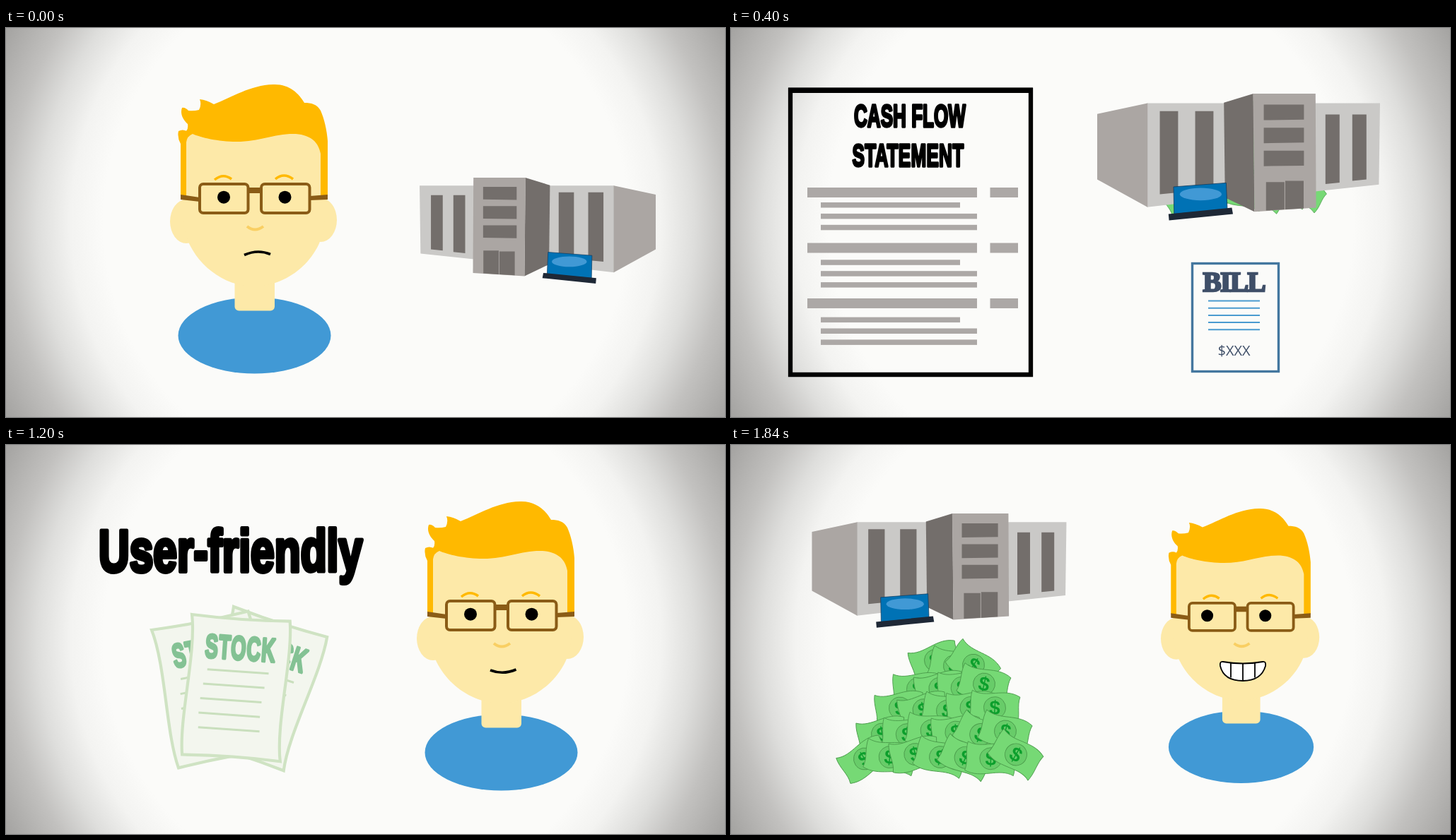
Animation of 1017 by 551 pixels, one loop 2 s. Source, as an HTML page:

```html
<!DOCTYPE html>
<html lang="en">
<head>
<meta charset="utf-8">
<title>Cash flow explainer</title>
<style>
  html, body { margin: 0; width: 100%; height: 100%; overflow: hidden; background: #fbfbf9; }
  svg { display: block; width: 100%; height: 100%; }
  .display { font-family: "Liberation Sans", Arial, sans-serif; font-weight: 700; stroke-linejoin: round; }
  .slab { font-family: "Liberation Serif", "Noto Serif", serif; font-weight: 700; }
  .light { font-family: "Open Sans", "Noto Sans", sans-serif; }
</style>
</head>
<body>
<svg id="stage" viewBox="0 0 1017 551" preserveAspectRatio="none" xmlns="http://www.w3.org/2000/svg"></svg>
<script>
const HOLD = 400;
const CAPS = 0.58, MIXED = 0.72; // the two condensed cuts of the display type

const SKIN = '#fde9a8', HAIR = '#ffb900', FRAME = '#8a5c16';
const LIGHT = '#cac9c7', MID = '#aba6a3', DARK = '#736e6b';
const BLUE = '#4199d5', INK = '#3f4f68';

const repeat = (n, make) => Array.from({ length: n }, (_, i) => make(i)).join('');
const poly = (points, fill, extra = '') => `<polygon points="${points}" fill="${fill}" ${extra}/>`;
const rect = (x, y, w, h, attrs = '') => `<rect x="${x}" y="${y}" width="${w}" height="${h}" ${attrs}/>`;
const oval = (cx, cy, rx, ry, fill) => `<ellipse cx="${cx}" cy="${cy}" rx="${rx}" ry="${ry}" fill="${fill}"/>`;
const line = (d, color, width) => `<path d="${d}" fill="none" stroke="${color}" stroke-width="${width}"/>`;
const use = (id, transform = '') => `<use href="#${id}" transform="${transform}"/>`;

function display(text, x, y, size, { cut = MIXED, gap = 0, fat = 3.5, color = '#000' } = {}) {
  return `<text class="display" transform="translate(${x} ${y}) scale(${cut} 1)" font-size="${size}"
    letter-spacing="${gap}em" fill="${color}" stroke="${color}" stroke-width="${fat}">${text}</text>`;
}

function random(seed) {
  return () => (seed = seed * 16807 % 2147483647) / 2147483647;
}

// Dark opening whose lower edge drops by `drop` towards the right
const pane = (x, y, w, h, drop = 0) =>
  poly(`${x},${y} ${x + w},${y} ${x + w},${y + h + drop} ${x},${y + h}`, DARK);

function building() {
  return poly('71,314 186,314 186,470 73,458', LIGHT)
    + poly('345,314 483,314 483,498 343,482', LIGHT)
    + poly('482,314 571,333 571,449 482,498', MID)
    + poly('295,297 347,313 345,481 293,506', DARK)
    + poly('185,297 295.5,297 293,506 184,499', MID)
    + repeat(2, i => pane(95 + 47.5 * i, 334, 25, 115 + 5.5 * i, 2.5))
    + repeat(3, i => pane(205.5, 316.5 + 40.7 * i, 71, 26.5, 1))
    + repeat(2, i => pane(206 + 34 * i, 451.5 + 2 * i, 32.5, 48.5, 2))
    + repeat(2, i => pane(365.5 + 62.5 * i, 328, 32.3, 132 + 12 * i, 3))
    + poly('343,455 436,462 435,510 341,502', '#0072b5', 'stroke="#123a5c" stroke-width="1"')
    + oval(388, 475, 37, 11, BLUE)
    + poly('333,499 445,510 444,521.5 331,510', '#1e2836');
}

// Head and shoulders without pupils and mouth
function bust() {
  const lens = x => rect(x, 221, 68.5, 41, `rx="5" fill="none" stroke="${FRAME}" stroke-width="4"`);
  return oval(351.5, 435.5, 108, 54, BLUE)
    + rect(323.5, 340, 56.5, 60.5, `rx="6" fill="${SKIN}"`)
    + oval(255, 274, 23, 31, SKIN) + oval(445, 272, 23, 31, SKIN)
    + `<path fill="${SKIN}" d="M250 145H451V270C450 322 402 366 351 366C300 366 253 322 250 270Z"/>`
    + `<path fill="${HAIR}" d="M247 238V164Q242 155 244 146Q250 143 255 146Q258 143 257 136C250 130 246 121 249 113
       Q253 112 258 117Q265 118 273 116Q277 108 274 101Q284 102 294 108C320 98 345 81 378 80C400 79 414 92 422 106
       C432 106 440 108 445 117C450 128 454 145 455 160V238H445V178C442 162 432 152 410 150
       C380 149 360 161 326 161C300 161 275 155 264 150Q256 153 255 162V238Z"/>`
    + line('M295 215Q307 205 319 214M381 214Q393 204 406 214', HAIR, 3.5)
    + lens(274) + lens(361)
    + rect(343, 226, 18, 8, `fill="${FRAME}"`)
    + poly('247,236 274,240 274,246 247,243', FRAME)
    + poly('430,238 455,236 455,243 430,244', FRAME)
    + line('M341 281Q352 290 364 281', '#f9cf63', 4);
}

function person(transform, look, mouth) {
  const pupils = repeat(2, i => oval(308 + 86.5 * i + look, 239.7, 9, 9, '#000'));
  return `<g transform="${transform}">${use('bust')}${pupils}</g>${mouth}`;
}

const lips = d => line(d, '#000', 3.6);

function grin() {
  return `<path fill="#fff" stroke="#000" stroke-width="1.8" d="M696 307Q724 312 752 307Q757 306 756 313
    Q750 334 724 334Q697 334 692 313Q691 306 696 307Z"/>`
    + line('M707 309V329.5M724 310V334M741 309V329.5', '#000', 1.8);
}

function note() {
  return `<path fill="#76d975" stroke="#4c9c4c" stroke-width="0.9" d="M-33 -23C-12 -12 12 -30 35 -17
    C31 -4 37 8 33 23C12 12 -12 30 -36 18C-31 5 -37 -8 -33 -23Z"/>
    <circle r="15.5" fill="#68cc69" stroke="#4c9c4c" stroke-width="0.9"/>
    <text class="display" y="9.5" font-size="28" text-anchor="middle" fill="#0c9f2c">$</text>`;
}

// Rows of notes, each wider than the one above and drawn over it
function pile() {
  const rnd = random(41);
  return repeat(5, row => {
    const count = row + 3, half = 27 + 20 * row;
    return repeat(count, i => {
      const side = 2 * i / (count - 1) - 1;
      const x = 316 - 5 * row + half * side;
      const y = 309 + 33 * row + 8 * (rnd() - 0.5);
      return use('note', `translate(${x} ${y}) rotate(${16 * side + 36 * (rnd() - 0.5)})`);
    });
  });
}

function statement() {
  const bar = (x, y, w, h) => rect(x, y, w, h, 'fill="#aca8a6"');
  return line('M84 88H424V491H84Z', '#000', 6.3) + rect(81, 84.5, 346, 7.5)
    + display('CASH FLOW', 174, 139.5, 45, { cut: CAPS })
    + display('STATEMENT', 171.5, 195.5, 45, { cut: CAPS, gap: 0.01 })
    + repeat(3, g => {
      const y = 226 + 78.5 * g;
      return bar(108, y, 240, 14) + bar(366.5, y, 39.5, 14)
        + repeat(3, i => bar(127, 247 + 81.3 * g + 15.9 * i, i ? 221 : 197, 7.5));
    });
}

function bill() {
  return rect(652.5, 333.5, 122, 153, 'fill="#fbfbf9" stroke="#44779f" stroke-width="3.4"')
    + `<text class="slab" x="667.5" y="372.8" font-size="39" letter-spacing="-1.4" fill="${INK}" stroke="${INK}" stroke-width="2.6">BILL</text>`
    + line(repeat(5, i => `M675 ${386.5 + 10.2 * i}h73`), '#4a9bd0', 2)
    + `<text class="light" x="711.5" y="464" font-size="20" text-anchor="middle" fill="${INK}">$XXX</text>`;
}

function sheet() {
  return `<path fill="#f3f6ee" stroke="#cfe3c3" stroke-width="4.2"
    d="M0 0Q70 4 139 0C147 55 129 145 139 199Q70 195 0 199C-8 145 10 55 0 0Z"/>`
    + display('STOCK', 22, 59, 47, { cut: CAPS, gap: 0.04, fat: 4, color: '#84c294' })
    + line(repeat(5, i => `M${19 + 0.9 * (i - 3) ** 2} ${76 + 20.7 * i}h87`), '#c9dfbd', 3);
}

const scenes = [
  person('', 0, lips('M337 321.5Q356 313 374 320.5')) + use('building', 'translate(537.6 13.6) scale(.668)'),

  statement() + use('pile', 'translate(489 -118) scale(.8)')
    + use('building', 'translate(974.8 -144.6) scale(-.8 .8)') + bill(),

  display('Cash from Operating Activities', 126, 114, 77, { gap: -0.032, fat: 4 })
    + display('-$$$', 239, 243.5, 98, { gap: 0.06, fat: 20 })
    + display('-$$$', 239, 243.5, 98, { gap: 0.06, fat: 5, color: '#ee0a0e' })
    + display('-$$$', 723.5, 261.5, 89, { gap: 0.03, fat: 6 })
    + use('building') + use('pile', 'translate(680 296.5) scale(.375)'),

  display('User-friendly', 131, 178.5, 84, { fat: 6 })
    + use('sheet', 'translate(322 229) rotate(18)') + use('sheet', 'translate(206 262) rotate(-11)')
    + use('sheet', 'translate(263 240) rotate(4)')
    + person('translate(349 0)', 0, lips('M685 319Q703 326 721.5 318')),

  use('building', 'translate(525.6 -116.8) scale(-.72 .72)') + use('pile')
    + person('translate(387.6 14) scale(.95)', -7, grin())
];

const stage = document.getElementById('stage');
const parts = { note, pile, building, bust, sheet };
stage.innerHTML = `<defs>
    <radialGradient id="vignette" gradientUnits="userSpaceOnUse" cx="509" cy="275" r="580">
      <stop offset="0.64" stop-color="#fbfbf9"/><stop offset="0.72" stop-color="#f3f3f1"/>
      <stop offset="0.8" stop-color="#dededc"/><stop offset="0.88" stop-color="#c2c1bf"/>
      <stop offset="1" stop-color="#a3a2a0"/>
    </radialGradient>
    ${Object.entries(parts).map(([id, make]) => `<g id="${id}">${make()}</g>`).join('')}
  </defs>`
  + rect(0, 0, 1017, 551, 'fill="url(#vignette)"')
  + scenes.map(body => `<g class="scene">${body}</g>`).join('');

const layers = [...stage.querySelectorAll('.scene')];

function draw(time) {
  const current = Math.floor(time / HOLD) % layers.length;
  layers.forEach((layer, i) => { layer.style.display = i === current ? '' : 'none'; });
}

const start = performance.now();
function tick() {
  draw(performance.now() - start);
  requestAnimationFrame(tick);
}
tick();
</script>
</body>
</html>
```
